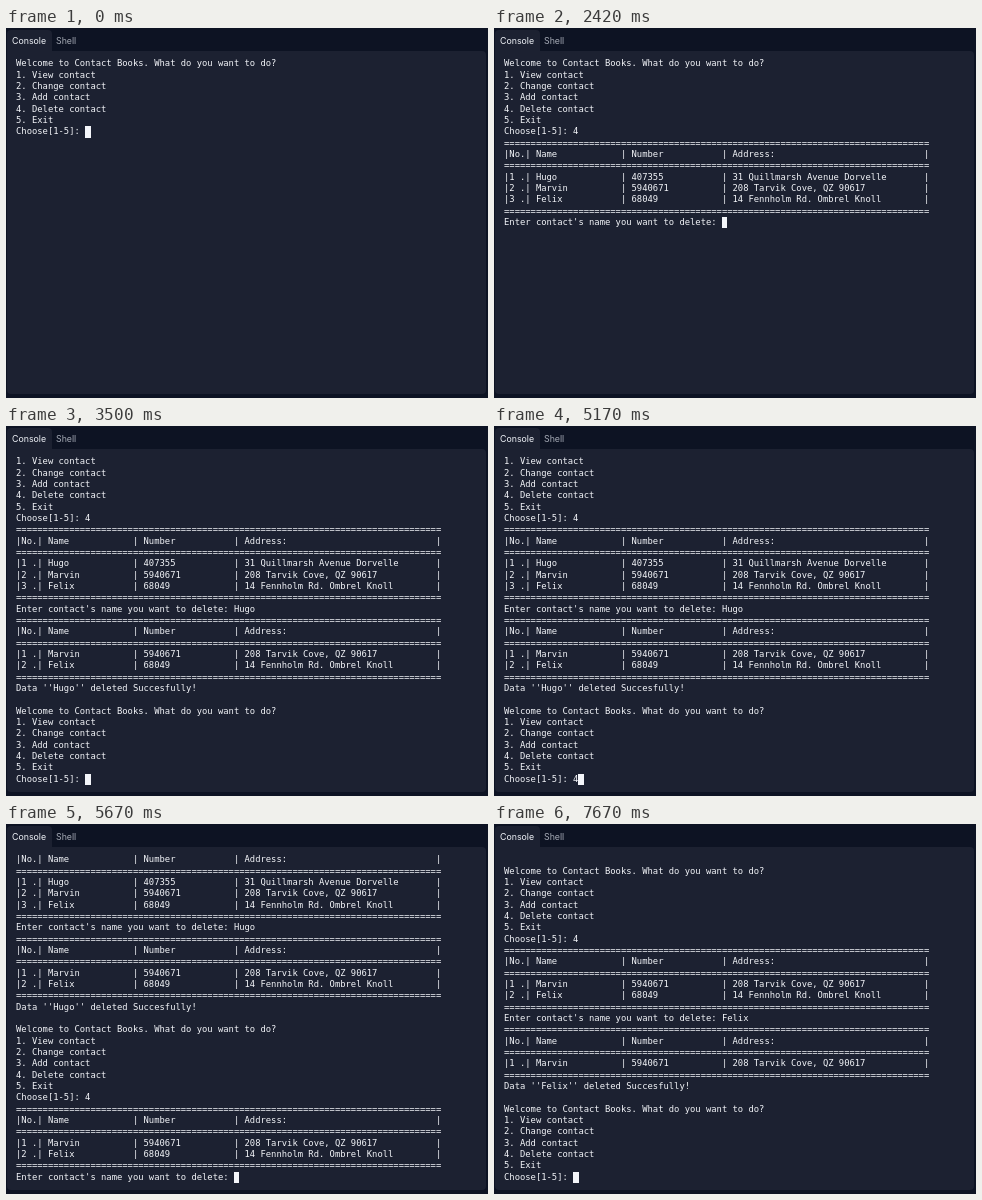
Recreate the animation shown at these times as an HTML page. Size 482 px wide and 370 px high, loop 8000 ms.

```html
<!DOCTYPE html>
<html lang="en">
<head>
<meta charset="utf-8">
<title>Contact Books</title>
<style>
  html, body { margin: 0; width: 100%; height: 100%; overflow: hidden; background: #0d1323; }
  .tab {
    position: absolute; top: 2px; height: 22px; line-height: 22px;
    font-family: Inter, sans-serif; font-size: 8.8px; color: #f0f3f8;
  }
  .active { left: 1px; width: 40px; padding-left: 5px; background: #1c2131; border-radius: 4px 4px 0 0; }
  .idle { left: 50px; color: #a5aab5; }
  .panel {
    position: absolute; left: 1px; top: 23px; width: 479px; height: 343px;
    background: #1c2131; border-radius: 0 4px 4px 4px;
  }
  pre {
    position: absolute; left: 10px; top: 30.4px; margin: 0;
    font-family: "DejaVu Sans Mono", monospace; font-size: 8.833px; line-height: 11.33px;
    color: #f4f6fa;
  }
  .cursor { position: absolute; width: 5.4px; height: 11.33px; background: #f4f6fa; }
</style>
</head>
<body>
<div class="tab active">Console</div>
<div class="tab idle">Shell</div>
<div class="panel"></div>
<pre><span id="output"></span><i class="cursor"></i></pre>
<script>
const LOOP = 8000;
const VISIBLE_ROWS = 29;

const contacts = [
  ["Hugo", "407355", "31 Quillmarsh Avenue Dorvelle"],
  ["Marvin", "5940671", "208 Tarvik Cove, QZ 90617"],
  ["Felix", "68049", "14 Fennholm Rd. Ombrel Knoll"]
];

const menu = [
  "Welcome to Contact Books. What do you want to do?",
  "1. View contact", "2. Change contact", "3. Add contact",
  "4. Delete contact", "5. Exit", "Choose[1-5]: "
].join("\n");
const rule = "=".repeat(80);
const ask = "Enter contact's name you want to delete: ";

const row = (no, name, number, address) =>
  `|${no}| ${name.padEnd(16)}| ${number.padEnd(17)}| ${address.padEnd(36)}|`;

function table(list) {
  const rows = list.map((contact, i) => row(`${i + 1} .`, ...contact));
  return [rule, row("No.", "Name", "Number", "Address:"), rule, ...rows, rule].join("\n");
}

const deleted = (name, rest) =>
  `\n${table(rest)}\nData ''${name}'' deleted Succesfully!\n\n${menu}`;

const [first, second, third] = contacts;
const typed = (name, times) => times.map((time, i) => [time, name[i]]);

// Each step appends its text to the console at the given time.
const steps = [
  [0, menu],
  [1250, "4"],
  [1670, `\n${table(contacts)}\n${ask}`],
  ...typed(first[0], [2670, 2830, 3000, 3250]),
  [3500, deleted(first[0], [second, third])],
  [5170, "4"],
  [5500, `\n${table([second, third])}\n${ask}`],
  ...typed(third[0], [6330, 6500, 6670, 6750, 6920]),
  [7170, deleted(third[0], [second])]
];

const output = document.getElementById("output");
let shown = 0;

function draw() {
  const time = performance.now() % LOOP;
  const count = steps.filter(([start]) => start <= time).length;
  if (count !== shown) {
    shown = count;
    const text = steps.slice(0, count).map(step => step[1]).join("");
    output.textContent = text.split("\n").slice(-VISIBLE_ROWS).join("\n");
  }
  requestAnimationFrame(draw);
}
draw();
</script>
</body>
</html>
```
